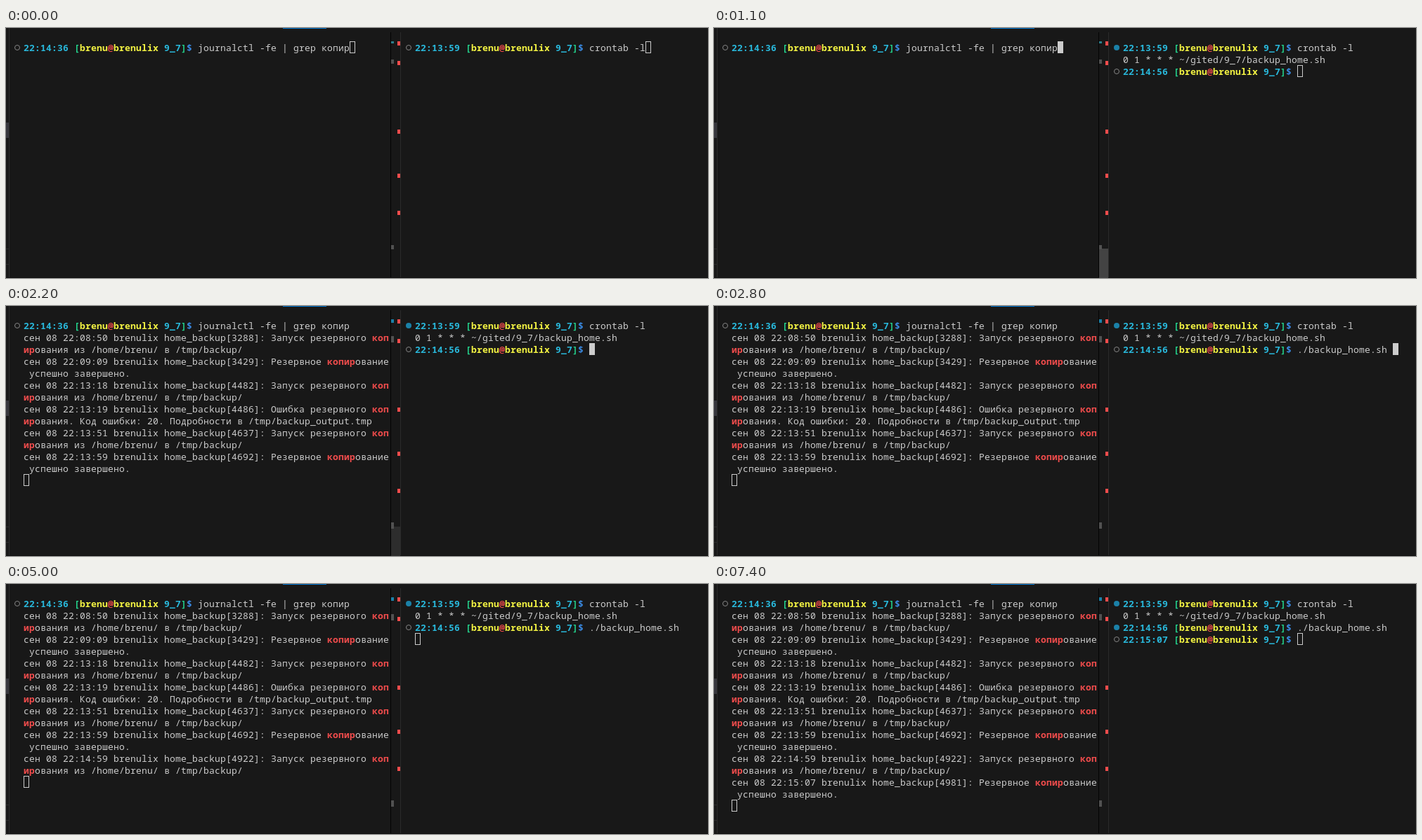
Write an HTML page with a canvas that moves like this. It is 999 px wide and 357 px high and loops after 8 s.

```html
<!DOCTYPE html>
<html lang="ru">
<head>
<meta charset="utf-8">
<title>Terminal</title>
<style>
  html, body { margin: 0; width: 100%; height: 100%; overflow: hidden; background: #181818; }
  canvas { display: block; width: 999px; height: 357px; }
</style>
</head>
<body>
<canvas id="stage" width="999" height="357"></canvas>
<script>
const ctx = document.getElementById('stage').getContext('2d');
const LOOP = 8000;
const CELL = 8, ROW = 17, TOP = 19;
const LEFT = 25, RIGHT = 582, COLS = 65;
const USER = 'brenu', HOST = 'brenulix';
const FONT = '13px "Noto Sans Mono", "DejaVu Sans Mono", monospace';
const C = {
  bg: '#181818', text: '#cccccc', cyan: '#29b8db', green: '#23d18b',
  yellow: '#f5f543', red: '#f14c4c', blue: '#3b8eea',
  ring: '#868686', done: '#1b81a8', line: '#2b2b2b', mark: '#515151'
};

// Log entries: time of appearance, clock, process id, message
const START = `Запуск резервного копирования из /home/${USER}/ в /tmp/backup/`;
const DONE = 'Резервное копирование успешно завершено.';
const FAIL = 'Ошибка резервного копирования. Код ошибки: 20. Подробности в /tmp/backup_output.tmp';
const LOG = [
  [1500, '22:08:50', 3288, START],
  [1500, '22:09:09', 3429, DONE],
  [1500, '22:13:18', 4482, START],
  [1500, '22:13:19', 4486, FAIL],
  [1500, '22:13:51', 4637, START],
  [1500, '22:13:59', 4692, DONE],
  [3700, '22:14:59', 4922, START],
  [7400, '22:15:07', 4981, DONE]
];

function rect(x, y, w, h, color) {
  ctx.fillStyle = color;
  ctx.fillRect(x, y, w, h);
}

const rowTop = row => TOP + row * ROW;

// Writes on the cell grid, wrapping at the pane width; returns the next cell index.
function write(x, row, col, text, color = C.text, bold = false) {
  ctx.font = (bold ? 'bold ' : '') + FONT;
  ctx.fillStyle = color;
  for (const ch of text) {
    const r = row + Math.floor(col / COLS);
    if (ch !== ' ') ctx.fillText(ch, x + (col % COLS) * CELL, rowTop(r) + 14);
    col++;
  }
  return col;
}

function cursor(x, row, col, solid) {
  const cx = x + col * CELL, cy = rowTop(row);
  if (solid) return rect(cx, cy, CELL, ROW, C.text);
  ctx.strokeStyle = C.text;
  ctx.lineWidth = 1;
  ctx.strokeRect(cx + 0.5, cy + 0.5, CELL - 1, ROW - 1);
}

function badge(x, row, done) {
  ctx.beginPath();
  ctx.arc(x - 9, rowTop(row) + 9, done ? 4 : 3.5, 0, Math.PI * 2);
  ctx.fillStyle = C.done;
  ctx.strokeStyle = C.ring;
  ctx.lineWidth = 1;
  if (done) ctx.fill(); else ctx.stroke();
}

function prompt(x, row, clock, command, done) {
  badge(x, row, done);
  const parts = [
    [clock + ' ', C.cyan], ['[', C.green], [USER, C.yellow], ['@', C.red],
    [HOST, C.yellow], [' 9_7', C.cyan], [']', C.green], ['$', C.blue]
  ];
  let col = 0;
  for (const [text, color] of parts) col = write(x, row, col, text, color, true);
  return write(x, row, col, ' ' + command);
}

function frame(t) {
  rect(0, 0, 999, 357, C.bg);
  rect(4, 0, 1, 357, C.line);
  rect(0, 135, 4, 22, '#37373d');
  rect(0, 315, 4, 1, C.line);
  rect(0, 337, 4, 1, C.line);
  rect(394, 0, 62, 1, '#0078d4');
  rect(547, 6, 1, 351, '#030303');
  rect(561, 6, 1, 351, C.line);
  rect(0, 356, 999, 1, '#101010');
}

function rulers(t) {
  if (t >= 1000 && t < 2300) {
    const faint = t < 1100 || t >= 2200;
    rect(548, 315, 13, 42, faint ? '#2d2d2d' : '#434343');
  }
  const grown = t >= 1500;
  rect(548, 19, 4, grown ? 5 : 3, grown ? C.done : '#2a7f8c');
  rect(548, grown ? 43 : 45, 4, grown ? 9 : 6, C.mark);
  rect(548, grown ? 309 : 310, 4, grown ? 9 : 6, C.mark);
  for (const y of [19, 47, 145, 208, 261]) rect(557, y, 4, 6, C.red);
}

function leftPane(t) {
  const end = prompt(LEFT, 0, '22:14:36', 'journalctl -fe | grep копир', false);
  const solid = t >= 1000 && t < 2200;
  if (t < 1500) return cursor(LEFT, 0, end, solid);
  let row = 1;
  for (const [at, clock, pid, message] of LOG) {
    if (t < at) break;
    const line = `сен 08 ${clock} ${HOST} home_backup[${pid}]: ${message}`;
    const [before, after] = line.split('копир');
    let col = write(LEFT, row, 0, before);
    col = write(LEFT, row, col, 'копир', C.red, true);
    write(LEFT, row, col, after);
    row += 2;
  }
  if (t >= 1700 && t < 1800) rect(LEFT + 40 * CELL, rowTop(8) + 15, 22 * CELL, 1, C.text);
  cursor(LEFT, row, 0, solid);
}

function recalled(t) {
  if (t < 2500) return '';
  return t < 2800 ? 'crontab -l' : './backup_home.sh ';
}

function rightPane(t) {
  const solid = (t >= 300 && t < 1000) || (t >= 2200 && t < 5000);
  let row = 0;
  let col = prompt(RIGHT, 0, '22:13:59', 'crontab -l', t >= 700);
  if (t >= 600) {
    write(RIGHT, 1, 0, '0 1 * * * ~/gited/9_7/backup_home.sh');
    row = 2;
    col = 0;
  }
  if (t >= 700) col = prompt(RIGHT, 2, '22:14:56', recalled(t), t >= 7200);
  if (t >= 3400) {
    row = 3;
    col = 0;
  }
  if (t >= 7200) col = prompt(RIGHT, 3, '22:15:07', '', false);
  cursor(RIGHT, row, col, solid);
}

function draw(now) {
  const t = now % LOOP;
  frame();
  rulers(t);
  leftPane(t);
  rightPane(t);
}

let origin;
function tick(now) {
  origin ??= now;
  draw(now - origin);
  requestAnimationFrame(tick);
}
draw(0);
requestAnimationFrame(tick);
</script>
</body>
</html>
```
